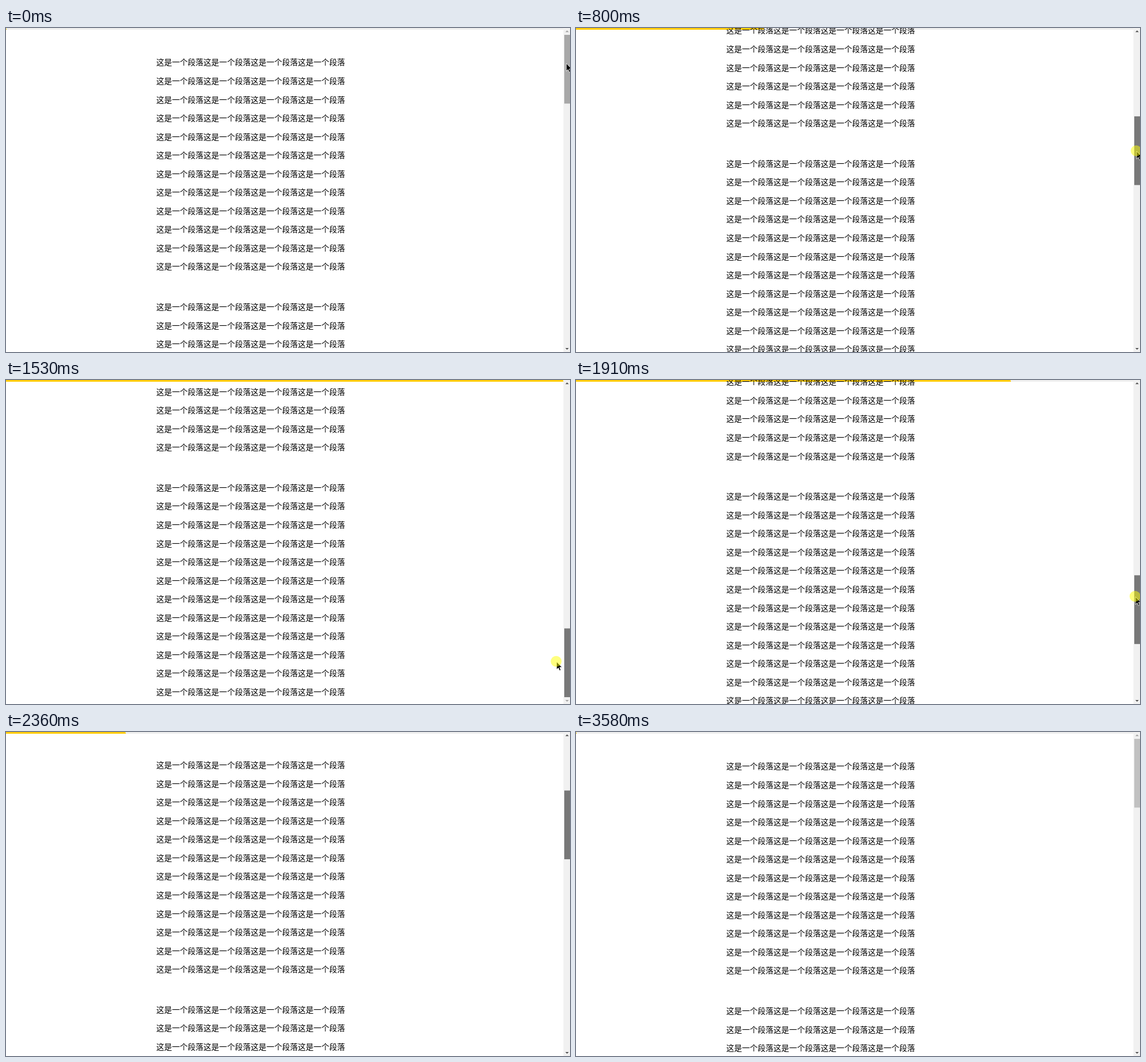
Recreate the animation shown at these times as an HTML page. Size 987 px wide and 568 px high, loop 3.88 s.

```html
<!DOCTYPE html>
<html lang="zh-CN">
<head>
<meta charset="utf-8">
<title>滚动进度条</title>
<style>
  html, body { margin: 0; width: 100%; height: 100%; overflow: hidden; background: #fff; }
  #stage { position: absolute; left: 0; top: 0; width: 987px; height: 568px; overflow: hidden; }
  #progress { position: absolute; left: 0; top: 0; width: 975.5px; height: 2.8px; overflow: hidden; }
  /* The diagonal edge slides through a thin slit and reads as a progress bar. */
  #slope {
    width: 975.5px; height: 2017.5px;
    background: linear-gradient(to right top, #fc0 50%, #eee 50%);
  }
  #page { position: absolute; left: 0; top: 0; }
  #page p {
    position: absolute; left: 263px; margin: 0; white-space: nowrap; color: #000;
    font: 13.78px/20px "Noto Sans CJK SC", "Noto Sans CJK", sans-serif;
  }
  svg { position: absolute; left: 0; top: 0; }
</style>
</head>
<body>
<div id="stage">
  <div id="progress"><div id="slope"></div></div>
  <div id="page"></div>
  <svg width="987" height="568" viewBox="0 0 987 568">
    <rect x="975.5" width="11.5" height="568" fill="#f1f1f1"/>
    <path id="up" d="M978.9 7.2h6l-3-3z"/>
    <path id="down" d="M978.9 560.9h6l-3 3z"/>
    <rect id="thumb" x="977" y="12" width="10" height="120.5"/>
    <g id="mouse">
      <path d="M0 0V13.6L3.1 10.7L5.2 15.5L7.5 14.5L5.4 9.8H9.6Z"
            fill="#000" stroke="#fff" stroke-width=".8"/>
      <circle id="press" cx="-.7" cy="-.7" r="9.5" fill="#ff0" fill-opacity=".5"/>
    </g>
  </svg>
</div>
<script>
const LOOP = 3880, SCROLL = 2014.7, TRAVEL = 423.5;
const $ = id => document.getElementById(id);
const [slope, page, up, down, thumb, mouse, press] =
  ['slope', 'page', 'up', 'down', 'thumb', 'mouse', 'press'].map($);

for (let group = 0; group < 6; group++) {
  for (let row = 0; row < 12; row++) {
    const p = document.createElement('p');
    p.textContent = '这是一个段落'.repeat(4);
    p.style.top = 49.4 + group * 428.7 + row * 32.55 + 'px';
    page.append(p);
  }
}

// time, scrolled fraction
const scrollKeys = [
  [0, 0], [230, 0], [350, .035], [490, .1], [610, .182], [680, .2317], [800, .3373],
  [940, .478], [1130, .702], [1200, .7674], [1320, .89], [1460, 1], [1530, 1],
  [1650, .975], [1790, .897], [1910, .78], [2100, .568], [2240, .396],
  [2430, .1076], [2500, .028], [2570, 0], [LOOP, 0]
];
// time, pointer x, pointer y
const mouseKeys = [
  [0, 980.5, 62], [160, 980.5, 66], [230, 980.5, 74], [350, 980.5, 90], [490, 981, 117],
  [680, 981, 172], [800, 981, 216], [940, 979, 277], [1200, 976, 400], [1320, 971, 452],
  [1460, 965, 499], [1530, 963.5, 494], [1650, 965, 478], [1790, 972, 440],
  [1910, 979, 380], [2100, 990.5, 275], [2170, 1010, 236], [2920, 1010, 236],
  [2930, 975.2, 426.2], [3060, 974.5, 445], [3255, 971, 498], [3385, 968, 548],
  [3450, 967.2, 567.2], [3579, 967.2, 567.2], [3580, 967, 620], [LOOP, 967, 620]
];

function at(keys, t) {
  const i = Math.max(1, keys.findIndex(k => k[0] >= t));
  const a = keys[i - 1], b = keys[i];
  const u = (t - a[0]) / (b[0] - a[0]);
  return a.slice(1).map((v, n) => v + (b[n + 1] - v) * u);
}

// Motion is sampled in an uneven 70/70/70/50 ms beat.
function snap(t) {
  if (t < 160) return 0;
  if (t >= 3450) return t < 3580 ? 3450 : 3580;
  if (t >= 2930) return 2930 + Math.floor((t - 2930) / 65) * 65;
  if (t >= 2680) return 2680;
  const beat = (t - 20) % 260;
  return t - beat + Math.min(3, Math.floor(beat / 70)) * 70;
}

function draw(time) {
  const t = snap(time);
  const [f] = at(scrollKeys, t);
  const [x, y] = at(mouseKeys, t);
  const shift = `translateY(${-f * SCROLL}px)`;
  slope.style.transform = page.style.transform = shift;
  thumb.setAttribute('y', 12 + f * TRAVEL);
  thumb.setAttribute('fill', t < 230 ? '#a8a8a8' : t < 2680 ? '#787878' : '#c1c1c1');
  up.setAttribute('fill', f > 0 ? '#505050' : '#a3a3a3');
  down.setAttribute('fill', f < 1 ? '#505050' : '#a3a3a3');
  mouse.setAttribute('transform', `translate(${x} ${y})`);
  press.setAttribute('visibility', t < 230 ? 'hidden' : 'visible');
}

const start = performance.now();
function tick() {
  draw((performance.now() - start) % LOOP);
  requestAnimationFrame(tick);
}
tick();
</script>
</body>
</html>
```
